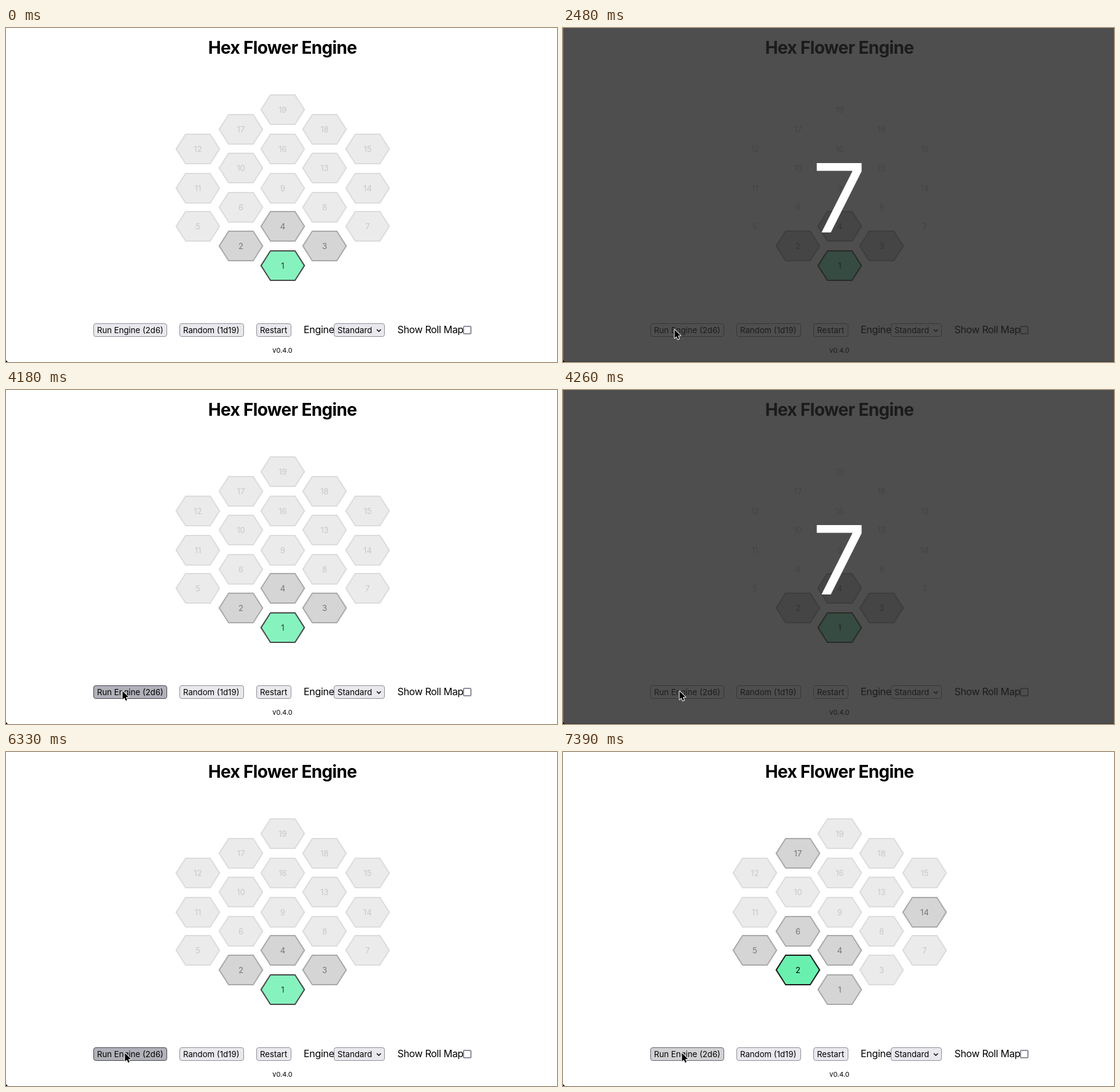
These frames come from a looping animation (896 by 544 pixels, 8 s). An HTML page with a canvas:

```html
<!DOCTYPE html>
<html lang="en">
<head>
<meta charset="utf-8">
<title>Hex Flower Engine</title>
<style>
html, body { margin: 0; width: 100%; height: 100%; overflow: hidden; background: #fff; }
canvas { display: block; }
</style>
</head>
<body>
<canvas id="stage" width="896" height="544"></canvas>
<script>
const ctx = document.getElementById('stage').getContext('2d');
const LOOP = 8000;
const TICK = 87;
const FONT = 'Inter, "Open Sans", sans-serif';

// Cell labels per column, left to right, each from top to bottom.
const LABELS = ['12 11 5', '17 10 6 2', '19 16 9 4 1', '18 13 8 3', '15 14 7'];
const WRAPS = { 2: ['14', '17'] };

const CELLS = LABELS.flatMap((column, i) => {
  const col = i - 2;
  const snap = col % 2 ? 1 : 2;
  return column.split(' ').map((label, j) => {
    const row = Math.abs(col) + 2 * j;
    return {
      label, col, row,
      x: 450 + 2 * Math.round(34.4 * col),
      y: 133 + snap * Math.round(31.75 * row / snap)
    };
  });
});

const STYLES = {
  idle: { fill: '#ebebeb', line: '#dcdcdc', text: '#c8c8c8' },
  near: { fill: '#d5d5d5', line: '#aaaaaa', text: '#777777' },
  fading: { fill: '#86f3bf', line: '#4a4a4a', text: '#333333' },
  current: { fill: '#69f0ae', line: '#1c1c1c', text: '#000000' }
};

const ROLLS = [
  { press: 2050, close: 3110, value: '7' },
  { press: 4180, close: 5340, value: '7' },
  { press: 6330, close: 7390, value: '11' }
];
const PRESS_TIME = 80;

const ENTER = { start: 1260, end: 1870, x: 197, y: 523 };
const MOVES = [
  { start: 1260, end: 1870, x: 183, y: 491 },
  { start: 2400, end: 2480, x: 181, y: 491 },
  { start: 3300, end: 3640, x: 187, y: 490 },
  { start: 3740, end: 3820, x: 189, y: 490 },
  { start: 5530, end: 5880, x: 193, y: 490 }
];

function pointerAt(t) {
  if (t < ENTER.start) return null;
  let { x, y } = ENTER;
  for (const m of MOVES) {
    if (t < m.start) break;
    const steps = Math.round((m.end - m.start) / TICK);
    const p = Math.min(1, Math.floor((t - m.start) / (m.end - m.start) * steps) / steps);
    const eased = 1 - (1 - p) ** 2;
    x += (m.x - x) * eased;
    y += (m.y - y) * eased;
  }
  return { x: Math.round(x), y: Math.round(y) };
}

function text(str, x, y, size, { color = '#000', weight = 400, align = 'left', spacing = 0 } = {}) {
  ctx.font = `${weight} ${size}px ${FONT}`;
  ctx.letterSpacing = spacing + 'px';
  ctx.textAlign = align;
  ctx.fillStyle = color;
  ctx.fillText(str, x, y);
}

function polygon(points, color) {
  ctx.beginPath();
  points.forEach(([x, y]) => ctx.lineTo(x, y));
  ctx.closePath();
  ctx.fillStyle = color;
  ctx.fill();
}

function hexagon(x, y, rx, ry, top, color) {
  polygon([[x - rx, y], [x - top, y - ry], [x + top, y - ry],
           [x + rx, y], [x + top, y + ry], [x - top, y + ry]], color);
}

function isNear(a, b) {
  const dc = Math.abs(a.col - b.col);
  const dr = Math.abs(a.row - b.row);
  return (dc < 2 && dc + dr === 2) || (WRAPS[b.label] || []).includes(a.label);
}

function drawHexes(label, dim) {
  const current = CELLS.find(c => c.label === label);
  const moved = label !== '1';
  const changing = dim && moved;
  for (const cell of CELLS) {
    const kind = cell === current ? (moved && !dim ? 'current' : 'fading')
      : isNear(cell, current) ? 'near' : 'idle';
    if (kind === 'idle' && changing) continue;
    const { x, y } = cell;
    const s = STYLES[kind];
    ctx.globalAlpha = changing && kind === 'near' ? 0.6 : 1;
    if (!(dim && kind === 'idle')) {
      hexagon(x, y, 36.5, 25, 20.5, s.line);
      hexagon(x, y, 34, 23, 19.5, s.fill);
    }
    text(cell.label, x, y + 4.7, 13.2, { color: s.text, align: 'center' });
  }
  ctx.globalAlpha = 1;
}

function button(label, x, w, fill, line = '#8f8f9d') {
  ctx.beginPath();
  ctx.roundRect(x + 0.5, 481.5, w - 1, 21, 3.5);
  ctx.fillStyle = fill;
  ctx.fill();
  ctx.strokeStyle = line;
  ctx.lineWidth = 1;
  ctx.stroke();
  text(label, x + 6, 497, 13.2);
}

function drawControls(runFill, runLine, fill) {
  button('Run Engine (2d6)', 142, 120, runFill, runLine);
  button('Random (1d19)', 282, 105, fill);
  button('Restart', 407, 57, fill);
  button('Standard', 533, 83, fill);
  text('Engine', 484, 497, 16, { spacing: -0.3 });
  text('Show Roll Map', 636.5, 497, 16, { spacing: -0.35 });
  text('v0.4.0', 449.5, 529, 11, { align: 'center' });

  ctx.beginPath();
  ctx.moveTo(603, 491);
  ctx.lineTo(606.3, 494.2);
  ctx.lineTo(609.6, 491);
  ctx.strokeStyle = '#000';
  ctx.lineWidth = 1.4;
  ctx.stroke();

  ctx.beginPath();
  ctx.roundRect(744, 486, 12, 12, 1.5);
  ctx.strokeStyle = '#8f8f9d';
  ctx.lineWidth = 2;
  ctx.stroke();
}

function drawPointer({ x, y }) {
  ctx.beginPath();
  [[0, 0], [0, 13.5], [3.1, 10.7], [5.2, 15.5], [7.4, 14.5], [5.4, 9.8], [9.6, 9.6]]
    .forEach(([dx, dy]) => ctx.lineTo(x + 0.5 + dx, y + 0.5 + dy));
  ctx.closePath();
  ctx.strokeStyle = '#fff';
  ctx.lineWidth = 2;
  ctx.lineJoin = 'round';
  ctx.stroke();
  ctx.lineJoin = 'miter';
  ctx.fillStyle = '#000';
  ctx.fill();
}

function drawOverlay(value) {
  ctx.fillStyle = 'rgba(34, 34, 34, 0.8)';
  ctx.fillRect(0, 0, 896, 544);
  text(value, 453, 333, 155, { color: '#fff', align: 'center', spacing: 8 });
  ctx.fillStyle = '#666';
  ctx.fillRect(0, 0, 1, 542);
  ctx.fillStyle = '#3a3a3a';
  ctx.fillRect(0, 543, 896, 1);
}

function draw(t) {
  const roll = ROLLS.find(r => t >= r.press && t < r.close);
  const dim = Boolean(roll && t >= roll.press + PRESS_TIME);
  const pointer = pointerAt(t);
  const current = t >= ROLLS[2].press + PRESS_TIME ? '2' : '1';

  ctx.fillStyle = '#fff';
  ctx.fillRect(0, 0, 896, 544);
  if (dim && current === '2') {
    ctx.fillStyle = '#e1e1e1';
    ctx.fillRect(275, 141, 350, 272);
  }
  text('Hex Flower Engine', 449.5, 42, 28, { weight: 700, align: 'center', spacing: -0.65 });
  drawHexes(current, dim);

  const hover = pointer && pointer.y < 503;
  if (dim) drawControls('#fff', '#8f8f9d', '#fff');
  else if (roll) drawControls('#b1b1b9', '#484851', '#e9e9ed');
  else if (hover) drawControls('#d2d2d5', '#676774', '#e9e9ed');
  else drawControls('#e9e9ed', '#8f8f9d', '#e9e9ed');

  if (dim) drawOverlay(roll.value);
  polygon([[0, 541], [0, 544], [3, 544]], '#000');
  if (pointer) drawPointer(pointer);
}

const origin = performance.now();
function tick() {
  draw((performance.now() - origin) % LOOP);
  requestAnimationFrame(tick);
}
tick();
</script>
</body>
</html>
```
